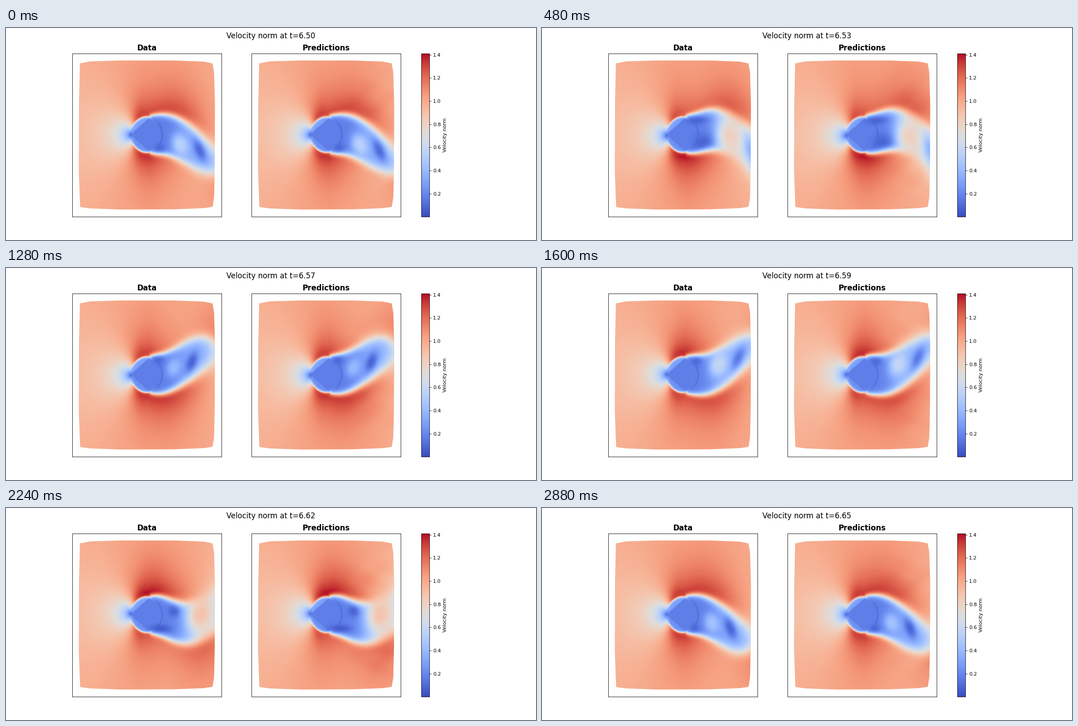
A matplotlib script for the animation above (3040 ms loop, 1183 by 473 pixels).

```python
import numpy as np
import matplotlib.pyplot as plt
from matplotlib.animation import FuncAnimation
from matplotlib.cm import ScalarMappable
from matplotlib.colors import Normalize
from matplotlib.patches import Polygon

W, H, DPI = 1183, 473, 80
FRAMES, STEP_MS = 19, 160
PERIOD, HALF = 19, 9.5        # one shedding cycle, in frames
CX, CY, RX, RY = 315, 239, 34, 38   # the body
MID = 238.5                   # symmetry axis of the flow

plt.rcParams["font.family"] = "DejaVu Sans"
norm = Normalize(0.0025, 1.411)

xs, ys = np.arange(160.0, 469), np.arange(70.0, 408)
x, y = np.meshgrid(xs, ys)
radius = np.hypot((x - CX) / RX, (y - CY) / RY)


def sigmoid(v):
    return 1 / (1 + np.exp(-np.clip(v, -40, 40)))


def softplus(v):
    return np.log1p(np.exp(v))


def cycle(p, period=PERIOD):
    return np.cos(2 * np.pi * p / period)


def blob(field, cx, cy, value, short, long, tilt, amount=1.0):
    """Pull the field towards a value inside a tilted soft ellipse."""
    c, s = np.cos(tilt), np.sin(tilt)
    u = (x - cx) * c - (y - cy) * s
    v = (x - cx) * s + (y - cy) * c
    g = np.exp(-0.5 * ((u / short) ** 2 + (v / long) ** 2) ** 1.2)
    return field + (value - field) * g * amount


def beyond(x0, y0, x1, y1):
    """Mask of points to the left of the chord from (x0, y0) to (x1, y1)."""
    return ((x1 - x0) * (y - y0) - (y1 - y0) * (x - x0)) < 0


def sides(p):
    """Age and direction of the lower and the upper vortex."""
    for shift, sign in ((0, 1), (HALF, -1)):
        yield (p - shift + 11) % PERIOD - 11, sign


def wake_edges(p):
    """The wake sways as a wave that grows and travels downstream."""
    sway = 4.7 * softplus((xs - 343) / 10) * cycle(p + 0.042 * (466 - xs))
    half = 45 - 5.5 * np.exp(-np.maximum(xs - 317, 0) / 14)
    tail = np.clip((xs - 400) / 66, 0, 1) ** 2
    half += tail * (12 * cycle(p - 3.6, HALF) - 9)
    return MID + sway - half, MID + sway + half


def add_core(field, age, sign):
    """Dark vortex core: born behind the body, crosses over, drifts away."""
    cx = 338 + 18 * softplus((age + 7.9) / 1.5)
    cy = MID + sign * 38 * np.tanh((age + 4.3) / 3.2)
    swell = 8 * np.exp(-(age + 6.75) ** 2)
    long = 16 + 6 * np.tanh((age + 2) / 1.5) + swell
    field = blob(field, cx, cy, 0.07 + 0.09 * max(age, 0),
                 9 + swell, long, sign * 0.35)
    # its return flow along the edge of the wake
    run = max(age + 5, 0)
    return blob(field, 345 + 15 * run, MID + sign * (32 + 5 * run), 0.05,
                18, 7, 0, np.exp(-((age + 5) / 2.2) ** 4))


def add_jet(field, age, sign):
    """Lighter flow between the core and the body."""
    size = np.clip(14 + 1.2 * age, 8, 22)
    return blob(field, 390 + 9.8 * age,
                MID + sign * 23 * np.exp(-(age / 2.4) ** 2),
                np.clip(0.54 + 0.09 * age, 0.2, 0.88),
                size, 1.35 * size, sign * 0.35, sigmoid(2 * (age + 4)))


def wake_speed(p):
    """Speed inside the body and the recirculating wake."""
    inner = 0.17 + 0.14 * sigmoid((x - 388) / 10)
    for q in (p % HALF, p % HALF + HALF):
        pulse = np.exp(-0.5 * ((x - 390 - 12.5 * q) / 25) ** 2)
        inner += 0.38 * min(q / 3, 1) * pulse

    facet = (radius < 1) & (x < 322)
    inner += 0.12 * (facet & beyond(281, 236, 321, 201))
    inner += 0.06 * (facet & beyond(321, 277, 281, 241))
    inner -= 0.06 * np.exp(-((radius - 1) / 0.06) ** 2) * sigmoid((x - 338) / 3)
    for age, sign in sides(p):
        inner = add_core(inner, age, sign)
    return np.maximum(inner, 0.02)


def fast_layer(p, gap):
    """Shear layer beside the wake, strongest where the wake bulges."""
    along = np.maximum(x - 320, 0)
    peak = 1.31 - 0.0015 * along
    peak += (0.09 + 0.0007 * along) * cycle(p - 13.3 - 0.072 * along)
    return 1 + (peak - 1) * np.exp(-np.maximum(gap - 12, 0) / 60)


def outer_speed(p, top, bottom):
    """Potential flow ahead of the body, fast layers beside the wake."""
    sway = 2.5 * np.sin(2 * np.pi * p / PERIOD)
    z = (x - CX) / RX + 1j * (y - CY - sway) / RY
    z = np.where(abs(z) < 0.6, 0.6, z)
    flow = abs(1 + 0.2 / z - 0.85 / z ** 2)
    flow = np.where(flow > 1, 1 + 0.4 * np.tanh((flow - 1) / 0.4), flow)

    over = fast_layer(p, top - y)
    under = fast_layer(p + HALF, y - bottom)
    beside = over + (under - over) * sigmoid((y - (top + bottom) / 2) / 6)
    return flow + (beside - flow) * sigmoid((x - 303) / 7)


def speed(p):
    top, bottom = wake_edges(p)
    soft = 2 + 7 * np.clip((xs - 318) / 148, 0, 1)

    def inside(gap, edge):
        return sigmoid(gap / (soft * np.hypot(1, np.gradient(edge))))

    wake = inside(y - top, top) * inside(bottom - y, bottom)
    wake = np.maximum(sigmoid((1.04 - radius) / 0.035),
                      wake * sigmoid((x - 320) / 2))
    field = outer_speed(p, top, bottom)
    field += (wake_speed(p) - field) * wake
    for age, sign in sides(p):
        field = add_jet(field, age, sign)
    return field, wake


rng = np.random.default_rng(4)
WAVES = [(rng.uniform(-0.09, 0.09), rng.uniform(0.05, 0.14),
          rng.uniform(0, 6.28), rng.integers(1, 3)) for _ in range(6)]


def ripple(p, wake):
    """Small uneven error of the predicted field downstream."""
    total = sum(np.sin(kx * x + ky * y + ph - n * 2 * np.pi * p / PERIOD)
                for kx, ky, ph, n in WAVES)
    near = np.exp(-((abs(y - MID) - 80) / 55) ** 2)
    return 0.007 * total * near * (1 - wake) * sigmoid((x - 385) / 18)


OUTLINE = [(165, 79), (188, 74.5), (257, 72.5), (375, 72.5), (441, 75),
           (461, 79), (464.5, 100), (466.5, 170), (466, 310), (464.5, 378),
           (461, 399), (441, 402), (375, 404.5), (257, 405), (188, 402.5),
           (165.5, 399.5), (162.5, 318), (163, 165)]


def panel(ax, title):
    im = ax.imshow(np.zeros(x.shape), cmap="coolwarm", norm=norm,
                   aspect="auto", interpolation="bilinear",
                   extent=(xs[0] - .5, xs[-1] + .5, ys[-1] + .5, ys[0] - .5))
    ax.set(xlim=(147.9, 481.3), ylim=(421, 56.8), xticks=[], yticks=[])
    im.set_clip_path(Polygon(OUTLINE, transform=ax.transData))
    ax.set_title(title, fontsize=15, fontweight="bold")
    return im


fig, axes = plt.subplots(1, 2, figsize=(W / DPI, H / DPI), dpi=DPI,
                         facecolor="white")
fig.colorbar(ScalarMappable(norm, "coolwarm"), ax=axes, label="Velocity norm")
data = panel(axes[0], "Data")
pred = panel(axes[1], "Predictions")
heading = fig.suptitle("", fontsize=15)


def update(i):
    field, wake = speed(i)
    data.set_data(field)
    pred.set_data(field + ripple(i, wake))
    heading.set_text(f"Velocity norm at t={6.501 + 0.0085 * i:.2f}")
    return data, pred, heading


anim = FuncAnimation(fig, update, frames=FRAMES, interval=STEP_MS,
                     repeat=True, repeat_delay=0, blit=False)
plt.show()
```
